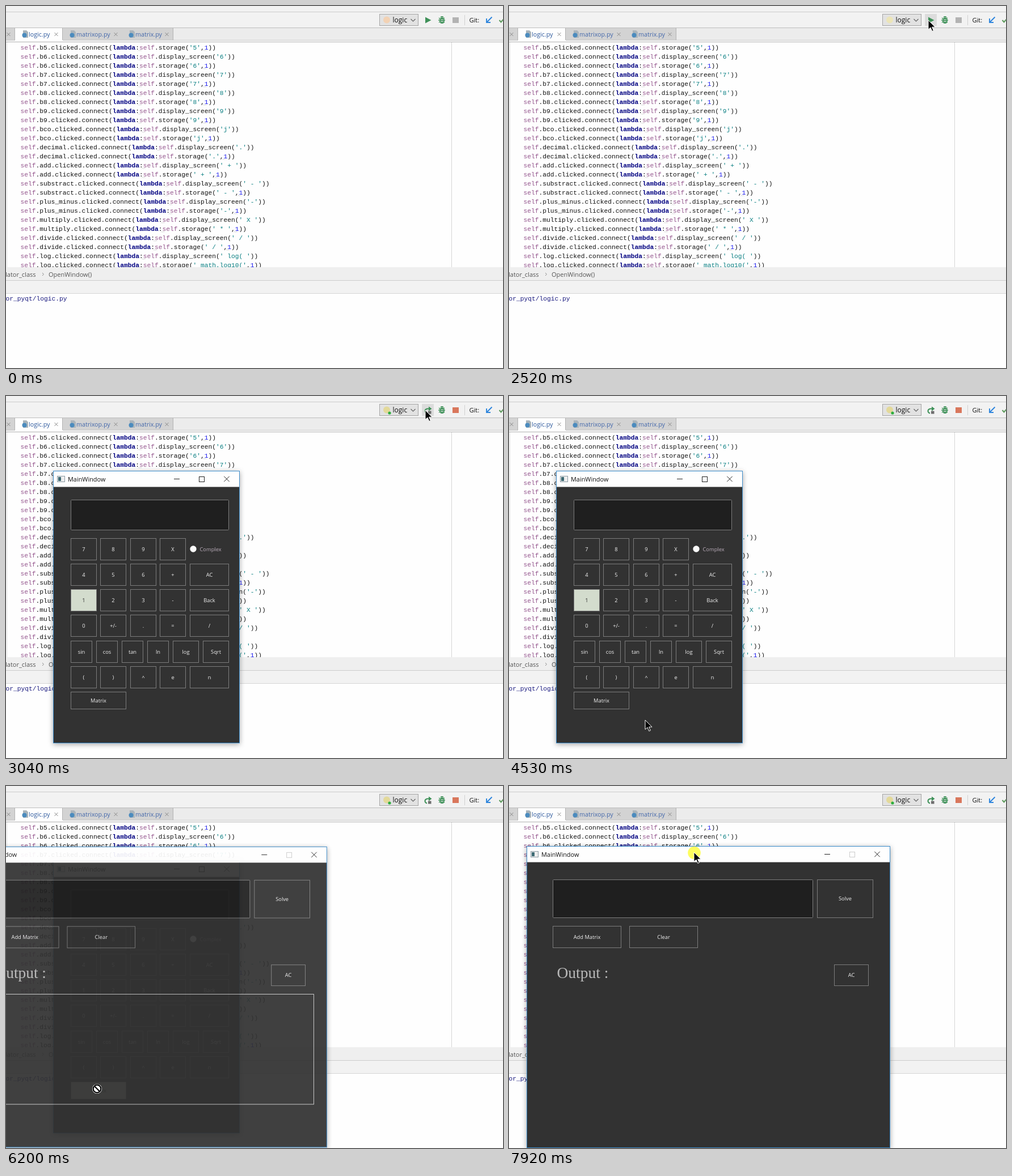
An HTML page that plays this animation: 876x639 px, repeating every 8 s.

```html
<!DOCTYPE html>
<html lang="en">
<head>
<meta charset="utf-8">
<style>
html, body { margin: 0; width: 100%; height: 100%; overflow: hidden; background: #fefefe; }
svg { display: block; }
text { font-family: "Open Sans", sans-serif; white-space: pre; }
.code { font: 11.25px "Liberation Mono", monospace; }
.self { fill: #94558d; }
.key { fill: #000080; font-weight: bold; }
.str { fill: #067d80; }
.num { fill: #1b1bef; }
.serif { font-family: "Liberation Serif", serif; }
.frame { filter: drop-shadow(0 2px 5px rgba(0, 0, 0, .35)); }
</style>
</head>
<body>
<svg id="stage" width="876" height="639" viewBox="0 0 876 639"></svg>
<script>
const LOOP = 8000;
const $ = id => document.getElementById(id);

// ---- drawing helpers ----
const rect = (x, y, w, h, fill, more = '') =>
  `<rect x="${x}" y="${y}" width="${w}" height="${h}" fill="${fill}" ${more}/>`;
const box = (x, y, x2, y2, fill, stroke, more = '') =>
  rect(x + .5, y + .5, x2 - x - 1, y2 - y - 1, fill, `stroke="${stroke}" ${more}`);
const line = (d, stroke, width = 1, more = '') =>
  `<path d="${d}" fill="none" stroke="${stroke}" stroke-width="${width}" ${more}/>`;
const shape = (d, fill, more = '') => `<path d="${d}" fill="${fill}" ${more}/>`;
const disc = (x, y, r, fill, more = '') => `<circle cx="${x}" cy="${y}" r="${r}" fill="${fill}" ${more}/>`;
const text = (x, y, s, size, fill, more = '') =>
  `<text x="${x}" y="${y}" font-size="${size}" fill="${fill}" ${more}>${s}</text>`;
const cross = (x, y, r, color) =>
  line(`M${x - r} ${y - r}l${2 * r} ${2 * r}m0 ${-2 * r}l${-2 * r} ${2 * r}`, color);
const group = (id, content) => `<g id="${id}">${content}</g>`;

// ---- editor ----
const PITCH = 6.75, MARGIN = 25.6;

function codeLine(row, name, method, arg) {
  const y = 77 + row * 16;
  const store = method === 'storage';
  const lambdaEnd = MARGIN + ('self..clicked.connect(lambda:'.length + name.length) * PITCH;
  const span = (cls, s) => `<tspan class="${cls}">${s}</tspan>`;
  const wave = x => line(`M${x} ${y + 2.5}l1.5 -1.5l1.5 1.5l1.5 -1.5l1.5 1.5`, '#ccc', .8);
  let out = `<text class="code" x="${MARGIN}" y="${y}" fill="#111">` + span('self', 'self') +
    `.${name}.clicked.connect(` + span('key', 'lambda') + ':' + span('self', 'self') +
    `.${method}(` + span('str', `'${arg}'`) + (store ? ',' + span('num', 1) : '') + '))</text>' +
    wave(lambdaEnd - 2);
  if (store) out += wave(lambdaEnd + (16 + arg.length) * PITCH - 2);
  return out;
}

function code() {
  const keys = [['b6', '6'], ['b7', '7'], ['b8', '8'], ['b9', '9'], ['bco', 'j'], ['decimal', '.'],
    ['add', ' + '], ['substract', ' - '], ['plus_minus', '-'], ['multiply', ' X ', ' * '],
    ['divide', ' / '], ['log', ' log( ', ' math.log10(']];
  return codeLine(0, 'b5', 'storage', '5') + keys.map(([name, shown, stored = shown], i) =>
    codeLine(2 * i + 1, name, 'display_screen', shown) +
    codeLine(2 * i + 2, name, 'storage', stored)).join('');
}

function tab(x, x2, label, active) {
  return rect(x, 39, x2 - x, active ? 24 : 21, active ? '#fefefe' : '#d3d3d3') +
    line(`M${x2 - .5} 39V60`, '#b4b4b4') +
    shape(`M${x + 14} 43h6l3 3v10h-9z`, '#aab4bb') + disc(x + 16.5, 51.5, 4, '#4b8bbe') +
    text(x + 24, 54, label, 10.7, active ? '#2b579c' : '#4468ab') +
    cross(x2 - 11.5, 50, 3, '#8a8a8a');
}

function toolbar() {
  const green = '#3f9159';
  const bug = line('M763 21l10 8M773 21l-10 8M762 25h12', green, 1.3) +
    shape('M764.5 24q0-3 4-3t4 3v3q0 4-4 4t-4-4z', green) +
    shape('M765.5 20.5q0-2.5 3-2.5t3 2.5z', green) + line('M766 24.5h5M766 27.5h5', '#eee');
  return rect(0, 0, 876, 64, '#f2f2f2') + rect(0, 10, 876, 1, '#cacaca') + rect(0, 38, 876, 1, '#bdbdbd') +
    rect(0, 39, 876, 21, '#ececec') + rect(0, 60, 876, 3, '#fbfbfb') +
    rect(0, 60, 876, 1, '#c6c6c6') + rect(0, 63, 876, 1, '#b2b2b2') +
    rect(0, 39, 16, 21, '#d3d3d3') + line('M15.5 39V60', '#b4b4b4') + cross(4.5, 50, 3, '#8a8a8a') +
    tab(16, 100, 'logic.py', true) + tab(100, 205, 'matrixop.py') + tab(204, 295, 'matrix.py') +
    box(658, 14, 727, 35, '#e2e2e2', '#a5a5a5') +
    disc(671, 24.5, 6, '#f2d2b4', 'id="badge"') +
    disc(676, 30, 2.6, '#2fae3e', 'id="live"') +
    text(681.5, 29, 'logic', 12, '#111') + line('M713.5 23l4 4l4-4', '#666', 1.2) +
    rect(733, 14, 21, 21, '#dcdcdc', 'id="hover"') +
    shape('M739 19.5v11l10.5-5.5z', green, 'id="play"') +
    group('rerun', line('M742 30.5q-3.5-1-3.5-4t4-4h4', green, 2) +
      shape('M745 18.5l5.5 4l-5.5 4z', green) + rect(744, 26.5, 5.5, 5, '#6e6e6e')) +
    bug + rect(787, 20, 11, 10, '#b3b3b3', 'id="stop"') + rect(808, 16, 1, 18, '#cfcfcf') +
    text(816.5, 29, 'Git:', 11, '#111') +
    line('M856.5 19.5l-9 9M847 22v7h7', '#2f86dd', 1.9) + line('M869.5 25l3 3.5l5-6', '#5b9a5b', 2);
}

function editor() {
  return rect(0, 0, 876, 639, '#fefefe') + rect(1, 64, 1, 397, '#dedede') + rect(785, 64, 1, 397, '#d6d6d6') +
    code() + rect(0, 461, 876, 46, '#f2f2f2') + rect(0, 461, 876, 23, '#efefef') +
    rect(0, 484, 876, 1, '#cdcdcd') + rect(0, 507, 876, 1, '#d6d6d6') + rect(0, 508, 876, 131, '#fefefe') +
    text(52.5, 478, 'ulator_class', 11, '#555', 'text-anchor="end"') +
    line('M64 471l2.5 2.5l-2.5 2.5', '#888') + text(75, 478, 'OpenWindow()', 11, '#555') +
    '<text class="code" x="-.5" y="520" fill="#1b1b80">or_pyqt/logic.py</text>' + toolbar();
}

// ---- application windows ----
function appWindow(x, y, x2, y2, maximizeColor, content) {
  const mid = y + 14.5;
  return rect(x, y, x2 - x, y2 - y, '#323232', 'class="frame"') + rect(x, y, x2 - x, 28.5, '#fefefe') +
    box(x, y, x2, y2, 'none', '#3b8ccb') +
    box(x + 7, y + 9, x + 21, y + 20, '#eee', '#8b9aa3') + rect(x + 9, y + 11, 5, 7, '#3d6a74') +
    text(x + 26, y + 18.5, 'MainWindow', 10.9, '#111') +
    rect(x2 - 116, y + 14, 10, 1, '#222') + box(x2 - 72, y + 10, x2 - 62, y + 20, 'none', maximizeColor) +
    cross(x2 - 23, mid, 4.7, '#222') + content;
}

function button(x, y, x2, y2, label, id) {
  return box(x, y, x2, y2, '#323232', '#7c7c7c', id ? `id="${id}"` : '') +
    text((x + x2) / 2, (y + y2) / 2 + 3.3, label, 9.3, '#f0f0f0',
      `text-anchor="middle" ${id ? `id="${id}Label"` : ''}`);
}

function calculator() {
  const wide = [[114, 160], [166, 212], [219, 265], [271, 317], [324, 393]];
  const narrow = [[114, 152], [159, 197], [204, 242], [249, 287], [294, 340], [347, 393]];
  const rows = ['7 8 9 X', '4 5 6 + AC', '1 2 3 - Back', '0 +/- . = /', 'sin cos tan ln log Sqrt', '( ) ^ e n'];
  const pad = rows.map((row, r) => {
    const labels = row.split(' '), cols = labels.length > 5 ? narrow : wide;
    const y = Math.round(251 + r * 45.15);
    return labels.map((s, c) => button(cols[c][0], y, cols[c][1], y + 39, s, s === '1' && 'one')).join('');
  }).join('');
  return appWindow(83, 132, 412, 613, '#222',
    box(114, 183, 393, 237, '#1f1f1f', '#7c7c7c', 'rx="1"') + pad +
    disc(330, 270, 5.7, '#fafafa') + text(341.5, 273.5, 'Complex', 9.3, '#bcaebc') +
    button(114, 522, 212, 553, 'Matrix', 'matrix'));
}

function matrixWindow() {
  return appWindow(31, 106, 672, 639, '#ccc',
    box(77, 165, 536, 233, '#1f1f1f', '#7c7c7c', 'rx="1"') + button(543, 165, 642, 233, 'Solve') +
    button(77, 247, 198, 286, 'Add Matrix') + button(212, 247, 333, 286, 'Clear') +
    text(84.5, 339, 'Output :', 27.5, '#b8b8b8', 'class="serif"') +
    button(573, 315, 634, 353, 'AC') + box(77, 367, 649, 563, 'none', '#c6c6c6', 'id="output"'));
}

function cursors() {
  return disc(0, 0, 11.3, '#fdfd5e', 'id="click"') +
    group('arrow', shape('M0 0V16.5L4 13L6.8 19.5L9.3 18.4L6.6 12.2H12z', '#000',
      'stroke="#fff" stroke-width="1" stroke-linejoin="round"')) +
    group('blocked', disc(0, 0, 8.6, '#fff') +
      disc(0, 0, 6.8, '#fff', 'stroke="#000" stroke-width="2.2"') + line('M-5 -5L5 5', '#000', 2.2));
}

$('stage').innerHTML = editor() + group('calc', calculator()) + group('matrixWin', matrixWindow()) + cursors();

// ---- motion ----
const ease = s => s * s * (3 - 2 * s);

// index of the current step (1..n), 0 before the first
const stepAt = (t, from, to, n) =>
  t < from ? 0 : Math.min(n, Math.floor((t - from + .5) * (n - 1) / (to - from)) + 1);

const moves = [ // from, to, steps, x, y
  [540, 1190, 9, 739, 30], [1360, 1510, 3, 739, 25], [3820, 4450, 9, 245, 585], [4530, 4531, 1, 240, 572],
  [4630, 4850, 4, 156, 538], [5090, 5170, 2, 160, 534], [6510, 7050, 8, 218, 87],
  [7210, 7350, 3, 220, 112], [7530, 7920, 6, 326, 117]];

function pointer(t) {
  let x = 650, y = 622;
  for (const [from, to, n, toX, toY] of moves) {
    const s = ease(stepAt(t, from, to, n) / n);
    x += (toX - x) * s;
    y += (toY - y) * s;
  }
  return [x, y];
}

const show = (id, on) => $(id).setAttribute('visibility', on ? 'visible' : 'hidden');
const place = (id, x, y) => $(id).setAttribute('transform', `translate(${x} ${y})`);
const fill = (id, color) => $(id).setAttribute('fill', color);
const between = (t, a, b) => t >= a && t < b;

function openWindow(id, alpha, cx, cy, dx = 0) {
  const scale = .95 + .05 * alpha;
  $(id).setAttribute('opacity', alpha);
  $(id).setAttribute('transform',
    `translate(${dx + cx * (1 - scale)} ${cy * (1 - scale)}) scale(${scale})`);
}

function light(id, on) {
  fill(id, on ? '#d3dccd' : '#323232');
  fill(id + 'Label', on ? '#2c2c2c' : '#f0f0f0');
}

function render(t) {
  const running = t >= 2820;
  show('play', !running);
  show('rerun', running);
  show('live', running);
  fill('stop', running ? '#d9775c' : '#b3b3b3');
  fill('badge', t < 1360 ? '#f2d2b4' : running ? '#e3d99a' : '#ece5b8');
  show('hover', between(t, 1360, 3820));

  openWindow('calc', [0, .25, .68, .93, 1][stepAt(t, 2820, 3040, 4)], 247.5, 372.5);
  light('one', t < 5500);
  light('matrix', t >= 4780);

  const drag = ease(stepAt(t, 7530, 7920, 6) / 6);
  openWindow('matrixWin', [0, .05, .34, .7, .93, 1][stepAt(t, 5960, 6280, 5)], 351.5, 372.5, 105 * (drag - 1));
  $('output').style.display = t < 6510 ? '' : 'none';

  const [x, y] = pointer(t);
  const blocked = between(t, 5500, 6510);
  place('arrow', x, y);
  place('blocked', x + .5, y + .5);
  place('click', x + .5, y + 1);
  show('arrow', t >= 540 && !blocked);
  show('blocked', blocked);
  show('click', between(t, 2350, 2520) || between(t, 5410, 5650) || t >= 7530);
}

const began = performance.now();
function tick() {
  render((performance.now() - began) % LOOP);
  requestAnimationFrame(tick);
}
tick();
</script>
</body>
</html>
```
